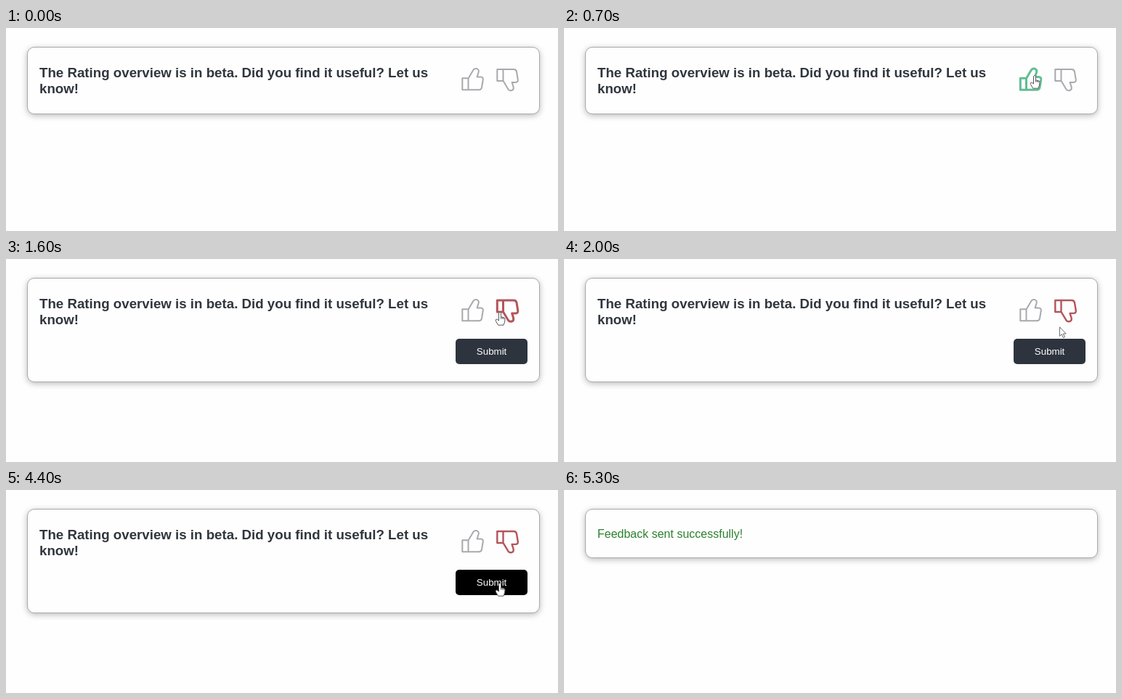
These frames come from a looping animation (760 px wide and 280 px high, 6200 ms). An HTML page:

```html
<!DOCTYPE html>
<html lang="en">
<head>
<meta charset="utf-8">
<title>Feedback card</title>
<style>
  html, body { margin: 0; width: 100%; height: 100%; overflow: hidden; background: #fefefe; }
  #card {
    position: absolute; left: 29px; top: 26px; width: 706px; box-sizing: border-box;
    border: 1px solid #a9a9ab; border-radius: 10px; background: #fefefe;
    box-shadow: 0 2px 9px rgba(0, 0, 0, .27);
  }
  svg { position: absolute; left: 0; top: 0; }
  text { font-family: "Liberation Sans", Arial, sans-serif; }
  .title { font-size: 18.72px; font-weight: bold; fill: #30363d; }
  .thumb { fill: none; stroke-linejoin: round; }
  .cursor { fill: #fff; stroke: #55585c; stroke-linejoin: round; }
</style>
</head>
<body>
<div id="card"></div>
<svg width="760" height="280">
  <defs>
    <path id="thumb" d="M628.3 69.3h8.2v16h-8.2zM636.5 69.5L643.6 57.6Q645 55.6 648 56.1Q651.6 57.2 650.6 61L648.6 67.4H653.6Q657.2 67.6 656.8 71L655 82Q654.3 85.3 651 85.3H636.5"/>
  </defs>
  <g id="form">
    <text class="title" x="46" y="68">The Rating overview is in beta. Did you find it useful? Let us</text>
    <text class="title" x="46" y="89.5">know!</text>
    <use id="up" class="thumb" href="#thumb"/>
    <use id="down" class="thumb" href="#thumb" transform="translate(48 142.3) scale(1 -1)"/>
    <g id="submit">
      <rect id="button" x="619" y="110" width="99" height="35" rx="5"/>
      <text x="668.6" y="132" font-size="13.33" text-anchor="middle" fill="#fff">Submit</text>
    </g>
  </g>
  <text id="sent" x="46" y="65.5" font-size="16" fill="#2c812f">Feedback sent successfully!</text>
  <path id="arrow" class="cursor" stroke-width=".9" d="M0 0V12.5L2.9 9.9 5 14.8 7.1 13.9 5 9.2H8.8Z"/>
  <path id="hand" class="cursor" stroke-width="1" d="M-1.5 1.4Q0 -.6 1.5 1.4V6.8L5.6 7.8Q7 8.3 7 10.2L6.5 14 5 18.2H-2.4L-5.6 12.6Q-6.6 10.2 -4.2 10L-1.5 12ZM1.5 6.8V9.6M3.4 7.3V9.8M5.2 7.8V10"/>
</svg>
<script>
const LOOP = 6200, STEP = 100, SELECT = 1600, SEND = 4600, ENTER = 100, LEAVE = 5300;

// Pointer tip: [time, x, y]
const path = [
  [100, 655, 170], [400, 651, 105], [700, 648, 65], [900, 648, 65],
  [1400, 680, 73], [1800, 680, 73], [2300, 686, 125], [4300, 686, 125],
  [4400, 680, 128], [4700, 673, 133], [5000, 667, 215], [5200, 663, 242]
];

const $ = id => document.getElementById(id);
const show = (id, on) => $(id).style.display = on ? "" : "none";

function tipAt(t) {
  let i = 1;
  while (i < path.length - 1 && path[i][0] < t) i++;
  const [t0, x0, y0] = path[i - 1], [t1, x1, y1] = path[i];
  const k = Math.min(1, Math.max(0, (t - t0) / (t1 - t0)));
  return [x0 + (x1 - x0) * k, y0 + (y1 - y0) * k];
}

function paintThumb(id, hover, active, color) {
  $(id).setAttribute("stroke", hover || active ? color : "#a8a9ad");
  $(id).setAttribute("stroke-width", hover ? 3 : active ? 2.4 : 2);
}

function draw(t) {
  const [x, y] = tipAt(t);
  const visible = t >= ENTER && t < LEAVE;
  const sent = t >= SEND, selected = t >= SELECT;
  const over = (left, top, right, bottom) =>
    visible && !sent && x >= left && x <= right && y >= top && y <= bottom;
  const up = over(627, 55, 658, 86);
  const down = over(675, 55, 707, 87);
  const button = selected && over(619, 110, 718, 145);
  const pointing = up || down || button;

  $("card").style.height = (sent ? 68 : selected ? 144 : 93) + "px";
  show("form", !sent);
  show("submit", selected);
  show("sent", sent);
  paintThumb("up", up, false, "#62bd92");
  paintThumb("down", down, selected, "#b4555b");
  $("button").setAttribute("fill", button ? "#000" : "#2e343e");

  show("hand", visible && pointing);
  show("arrow", visible && !pointing);
  for (const id of ["hand", "arrow"]) $(id).setAttribute("transform", `translate(${x} ${y})`);
}

let start;
function tick(now) {
  start ??= now;
  const t = (now - start) % LOOP;
  draw(Math.floor(t / STEP) * STEP);
  requestAnimationFrame(tick);
}
draw(0);
requestAnimationFrame(tick);
</script>
</body>
</html>
```
